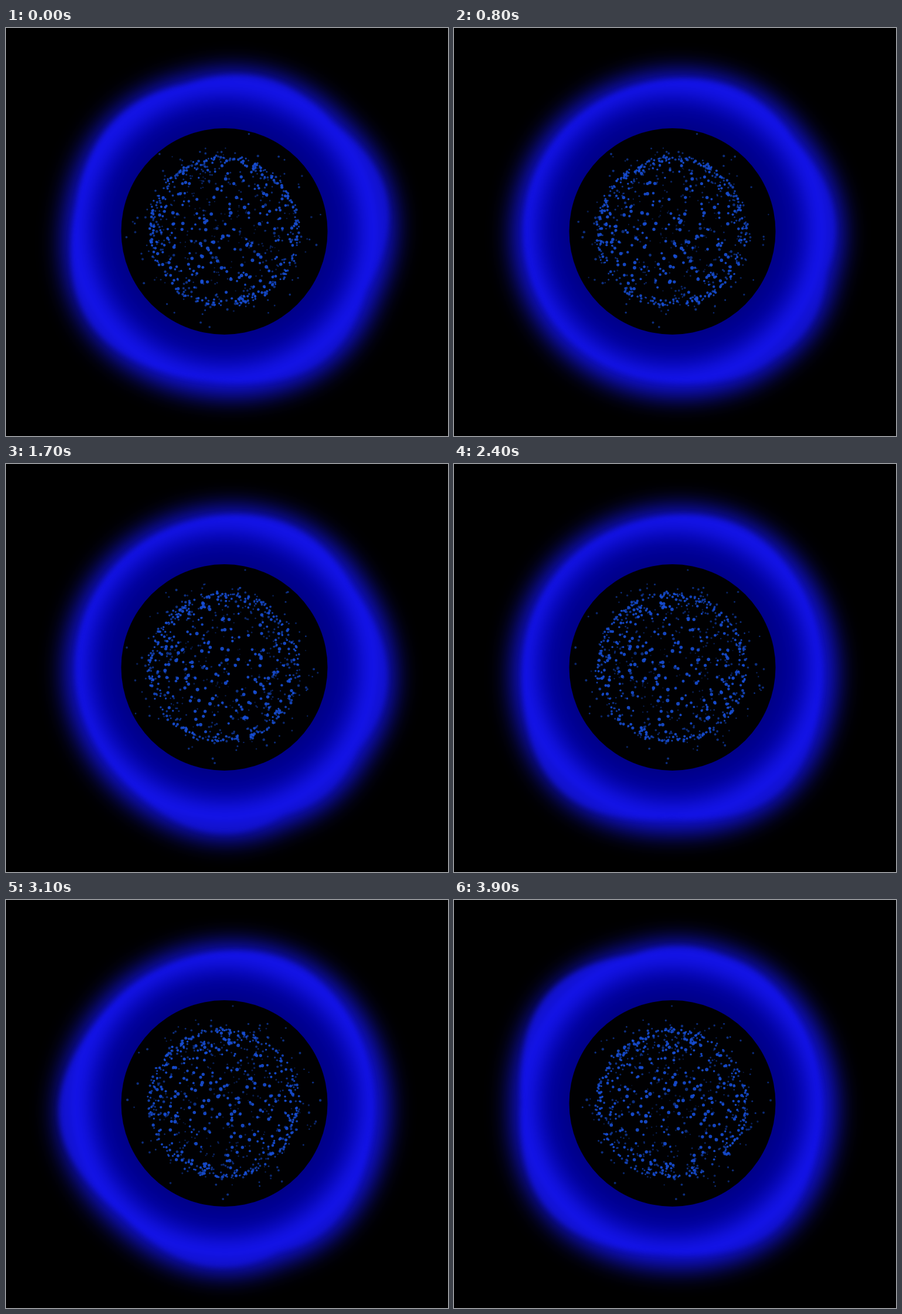
Animation, 754 px wide and 696 px high, one loop 4000 ms. Source, as an HTML page with a canvas:

```html
<!DOCTYPE html>
<html lang="en">
<head>
<meta charset="utf-8">
<title>Blue ring</title>
<style>
  html, body { margin: 0; width: 100%; height: 100%; overflow: hidden; background: #000; }
  canvas { display: block; }
</style>
</head>
<body>
<canvas id="stage" width="754" height="696"></canvas>
<script>
const ctx = document.getElementById('stage').getContext('2d');
const LOOP = 4000, STEP = 100, TAU = Math.PI * 2;
const CX = 372.5, CY = 347, HOLE = 176, BASE = 254;
const rad = deg => deg * Math.PI / 180;
const clamp = v => Math.max(0, Math.min(1, v));

// Small seeded generator keeps the cloud identical on every load.
let seed = 7319;
function rnd() {
  seed = (seed * 1664525 + 1013904223) % 4294967296;
  return seed / 4294967296;
}

function makeDots(count, near, far, size, glow) {
  return Array.from({ length: count }, () => {
    const y = rnd() * 2 - 1;
    return {
      y, ring: Math.sqrt(1 - y * y), turn: rnd() * TAU,
      r: near + (far - near) * Math.pow(rnd(), 1.5),
      size: size * (0.7 + rnd() * 0.5), glow
    };
  });
}
const dots = [
  ...makeDots(690, 125, 131, 1, 1),
  ...makeDots(170, 131, 172, 0.85, 0.65)
];

// Each swell: direction in degrees, height in pixels, sharpness.
function swells(t) {
  const fade = clamp(1 - t / 0.7);
  return [
    [-12 + 60 * t, 29, 8],
    [-94 + 60 * t, 25 * clamp((t - 0.8) / 0.9), 8],
    [146 + 60 * t, 23 * fade, 8],
    [228 + 60 * t, 13 * fade, 8],
    [-74 + 90 * t, 13 + 11 * Math.cos(TAU * (t - 0.8) / 4), 8],
    [52, 22, 9],
    [-64, 13, 8]
  ];
}

function outline(list, cx, cy, base, gain) {
  const path = new Path2D();
  for (let i = 0; i < 240; i++) {
    const a = TAU * i / 240;
    let lift = 0;
    for (const [dir, height, sharp] of list) {
      lift = Math.max(lift, height * Math.exp(sharp * (Math.cos(a - rad(dir)) - 1)));
    }
    const r = base + lift * gain;
    path.lineTo(cx + r * Math.cos(a), cy + r * Math.sin(a));
  }
  path.closePath();
  return path;
}

const body = ctx.createRadialGradient(CX, CY, HOLE, CX, CY, 290);
[
  [176, '0,0,136'], [192, '0,0,146'], [208, '2,2,159'], [224, '8,8,186'],
  [240, '16,16,216'], [254, '19,19,232'], [270, '18,18,210'], [290, '17,17,190']
].forEach(([r, c]) => body.addColorStop(clamp((r - HOLE) / (290 - HOLE)), `rgb(${c})`));

function blurFill(path, fill, blur) {
  ctx.filter = `blur(${blur}px)`;
  ctx.fillStyle = fill;
  ctx.fill(path);
  ctx.filter = 'none';
}

function drawRing(t) {
  const list = swells(t);
  blurFill(outline(list, CX + 4, CY + 5, BASE + 22, 0.45), 'rgb(17,17,222)', 20);
  blurFill(outline(list, CX, CY, BASE - 1, 1), body, 4);
  ctx.fillStyle = '#000002';
  ctx.beginPath();
  ctx.arc(CX, CY, HOLE, 0, TAU);
  ctx.fill();
}

function drawDots(t) {
  ctx.fillStyle = 'rgb(23,78,212)';
  for (const d of dots) {
    const a = d.turn + 0.45 * t;
    const x = CX - 1 + d.r * d.ring * Math.sin(a);
    const y = CY + d.r * d.y;
    const depth = (d.ring * Math.cos(a) + 1) / 2;
    ctx.globalAlpha = d.glow * Math.min(0.9, 0.3 + depth);
    ctx.beginPath();
    ctx.arc(x, y, d.size * (1.4 + 1.3 * depth), 0, TAU);
    ctx.fill();
  }
  ctx.globalAlpha = 1;
}

function draw(ms) {
  const t = Math.floor((ms % LOOP) / STEP) * STEP / 1000;
  ctx.fillStyle = '#000';
  ctx.fillRect(0, 0, 754, 696);
  drawRing(t);
  drawDots(t);
}

const start = performance.now();
function tick() {
  draw(performance.now() - start);
  requestAnimationFrame(tick);
}
tick();
</script>
</body>
</html>
```
